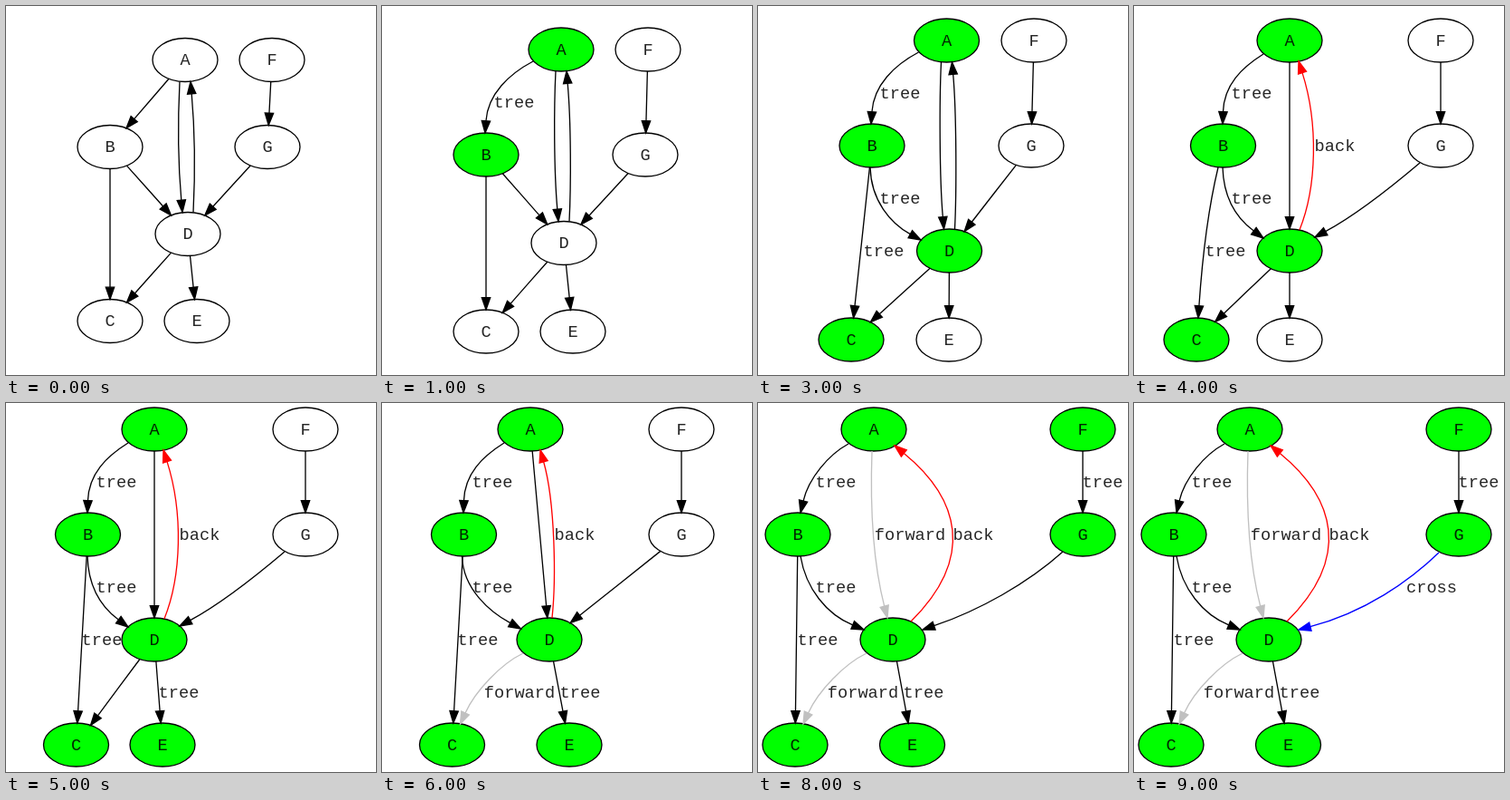
These frames come from a looping animation (409x407 px, 10000 ms). An HTML page:

```html
<!DOCTYPE html>
<html lang="en">
<head>
<meta charset="utf-8">
<title>Depth-first search edges</title>
<style>
  html, body { margin: 0; width: 100%; height: 100%; overflow: hidden; background: #fff; }
  svg { display: block; width: 100vw; height: 100vh; }
  text { font: 18.67px "Courier New", "Liberation Mono", monospace; text-anchor: middle; fill: #000; fill-opacity: .85; }
  ellipse, path { stroke-width: 1.33; }
</style>
</head>
<body>
<svg id="stage" viewBox="0 0 409 407"></svg>
<script>
const STEP_MS = 1000;
const RX = 36, RY = 24, ARROW = 13.3, ARROW_HALF = 4.67;
const NODES = 'ABCDEFG';
const RANK = { A: 0, F: 0, B: 1, G: 1, D: 2, C: 3, E: 3 };
const COLORS = { tree: '#000', back: '#f00', forward: '#c0c0c0', cross: '#00f' };

// Edges in the order the search classifies them, one per step.
const EDGES = [['AB', 'tree'], ['BC', 'tree'], ['BD', 'tree'], ['DA', 'back'], ['DE', 'tree'],
  ['DC', 'forward'], ['AD', 'forward'], ['FG', 'tree'], ['GD', 'cross']];

// Curves: start and first handle relative to the tail node, second handle and tip relative to the head node.
const pair = {
  AD: [-6, 24, -8, 64, -11, -80, -6, -24],
  DA: [6, -24, 8, -64, 11, 80, 6, 24]
};
const treeWide = [-31, 13, -57.5, 27, 2, -67, -1, -24];
const treeTight = [-29, 15, -53, 30, 1, -67, -.5, -24];
const treeSlant = [-28, 16, -50, 28, 12, -62, 3, -24];
const branchDown = [-2, 24, -1, 61, -64.5, -30, -31.5, -12];
const branchTight = [-.5, 24, .5, 58, -60, -37, -29, -14];
const branchSlant = [3, 24, 9, 60, -73, -28, -32, -11];
const backBow = [11, -23, 30, -70, 32, 92, 10, 23];
const backFlat = [3, -24, 7.5, -66, 27.5, 81, 11, 23];
const backWide = [20, -20, 92, -91, 94, 76, 23, 18];
const forwardLow = [-29, 15, -54, 27, 25.5, -59, 9, -23];
const forwardLong = [-2, 24, -4, 81, -22, -86, -6, -24];
const sideBow = [-23, 19, -49, 41, 78, -42, 28, -15];
const sideWide = [-22, 19, -61, 54, 95, -32, 33, -11];
const sideCross = [-22, 20, -54, 51, 106, -30, 33, -11];

const plainRows = [59.5, 155.5, 251.5, 347.5];
const shortRows = [48, 164, 261.5, 359];
const midRows = [38, 154, 270, 368];
const tallRows = [29, 145, 261, 377];
const finalCurves = { AB: treeSlant, BD: branchSlant, DA: backWide, DC: forwardLow, AD: forwardLong, GD: sideWide };

// xs: node centres A..G; labels: label centres in edge order.
const finalLayout = {
  rows: tallRows, xs: [128, 44, 41, 149, 170.5, 359, 359], seen: 'ABCDEFG',
  labels: [86, 66, 86, 238, 183, 116, 168, 381, 329], curves: finalCurves
};
const STATES = [
  { rows: plainRows, xs: [198, 115, 115, 201, 211, 294, 289], seen: '', labels: [], curves: pair },
  { rows: shortRows, xs: [198, 115, 115, 201, 211, 294, 291], seen: 'AB', labels: [146],
    curves: { ...pair, AB: treeWide } },
  { rows: shortRows, xs: [204.5, 122, 107, 207.5, 207.5, 301, 298], seen: 'ABC', labels: [153, 136],
    curves: { ...pair, AB: treeWide, BC: [-3, 24, -7, 56, 4, -69, 1, -24] } },
  { rows: midRows, xs: [208.5, 126, 103, 211.5, 211, 305, 302], seen: 'ABCD', labels: [157, 139, 157],
    curves: { ...pair, AB: treeWide, BD: branchDown } },
  { rows: midRows, xs: [172, 98.5, 69, 172, 172, 339, 339], seen: 'ABCD', labels: [130, 101, 130, 222],
    curves: { AB: treeTight, BC: [-5.5, 24, -18, 76, 6, -83, 2, -24], BD: branchTight, DA: backBow, GD: sideBow } },
  { rows: tallRows, xs: [164, 90.5, 77.5, 164, 173, 331, 331], seen: 'ABCDE', labels: [122, 106, 122, 214, 191],
    curves: { AB: treeTight, BD: branchTight, DA: backBow, GD: sideBow } },
  { rows: tallRows, xs: [164, 90.5, 77.5, 185, 207, 331, 331], seen: 'ABCDE', labels: [122, 106, 122, 213, 219, 152],
    curves: { AB: treeTight, BD: branchDown, DA: backFlat, DC: forwardLow } },
  { rows: tallRows, xs: [132, 48, 45, 153, 174.5, 363, 363], seen: 'ABCDE',
    labels: [90, 70, 90, 242, 187, 120, 172], curves: finalCurves },
  { ...finalLayout, labels: finalLayout.labels.slice(0, 8) },
  { ...finalLayout, curves: { ...finalCurves, GD: sideCross } }
];

const textAt = (x, y, s) => `<text x="${x}" y="${y + 5.5}">${s}</text>`;

// Offsets of a straight centre-to-centre edge, clipped to both ellipses.
function straight(from, to) {
  const dx = to.x - from.x, dy = to.y - from.y;
  const k = 1 / Math.hypot(dx / RX, dy / RY);
  const x = dx * k, y = dy * k;
  return [x, y, x * 1.3, y * 1.3, -x * 2, -y * 2, -x, -y];
}

function drawEdge(from, to, curve, color) {
  const [sx, sy, ax, ay, bx, by, tx, ty] = curve;
  const length = Math.hypot(tx - bx, ty - by);
  const ux = (tx - bx) / length, uy = (ty - by) / length;
  const tip = { x: to.x + tx, y: to.y + ty };
  const base = { x: tip.x - ux * ARROW, y: tip.y - uy * ARROW };
  const wx = -uy * ARROW_HALF, wy = ux * ARROW_HALF;
  return `<path fill="none" stroke="${color}" d="M${from.x + sx} ${from.y + sy}
    C${from.x + ax} ${from.y + ay} ${to.x + bx} ${to.y + by} ${base.x} ${base.y}"/>
    <path fill="${color}" stroke="${color}" d="M${tip.x} ${tip.y}
    L${base.x + wx} ${base.y + wy} L${base.x - wx} ${base.y - wy}Z"/>`;
}

function render({ rows, xs, seen, labels, curves }) {
  const at = {};
  [...NODES].forEach((n, i) => at[n] = { x: xs[i], y: rows[RANK[n]] });
  let edges = '', words = '', nodes = '';
  EDGES.forEach(([name, kind], i) => {
    const from = at[name[0]], to = at[name[1]];
    const known = i < labels.length;
    edges += drawEdge(from, to, curves[name] || straight(from, to), known ? COLORS[kind] : '#000');
    const labelY = name === 'BC' ? rows[2] : (from.y + to.y) / 2;
    if (known) words += textAt(labels[i], labelY, kind);
  });
  for (const n of NODES) {
    const { x, y } = at[n];
    nodes += `<ellipse cx="${x}" cy="${y}" rx="${RX}" ry="${RY}" stroke="#000"
      fill="${seen.includes(n) ? '#0f0' : '#fff'}"/>` + textAt(x, y, n);
  }
  return nodes + edges + words;
}

const stage = document.getElementById('stage');
const start = performance.now();
let shown = -1;
function tick() {
  const index = Math.floor((performance.now() - start) / STEP_MS) % STATES.length;
  if (index !== shown) stage.innerHTML = render(STATES[shown = index]);
  requestAnimationFrame(tick);
}
tick();
</script>
</body>
</html>
```
